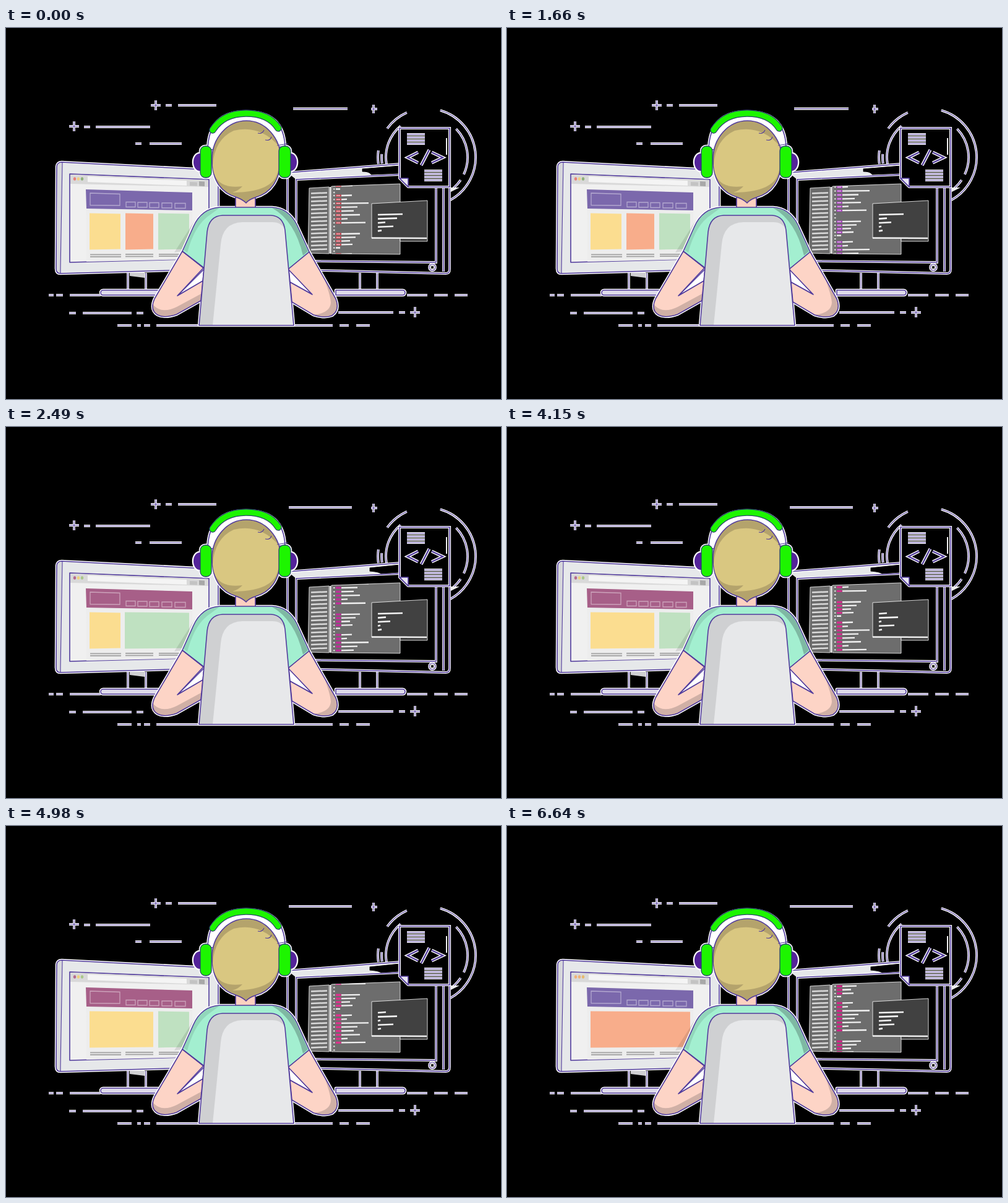
An HTML page that plays this animation: 800 px wide and 600 px high, repeating every 7470 ms.

```html
<!DOCTYPE html>
<html lang="en">
<head>
<meta charset="utf-8">
<title>Coder at work</title>
<style>
  html, body { margin: 0; width: 100%; height: 100%; overflow: hidden; background: #000; }
  svg { display: block; width: 100%; height: 100%; }
  .ink { fill: none; stroke: #513b9c; stroke-width: 1.1; }
  .halo { fill: none; stroke: #fff; stroke-width: 3.8; }
  .edge { stroke: #513b9c; stroke-width: 1.6; stroke-linejoin: round; }
  .rim { fill: #fff; stroke: #fff; stroke-width: 4.6; stroke-linejoin: round; }
</style>
</head>
<body>
<svg viewBox="0 0 800 600">
  <defs>
    <path id="sparks" d="M234 125h16m-8-8v16M258 125h10M278 125h62M102 159h16m-8-8v16M126 160h10M145 160h88
      M209 187h10M232 187h52M594 124v14M590 131h10M69 432h8M81 432h11M103 432h50M648 432h33M692 432h22M725 432h21
      M102 461h11M124 461h79M211 461h11M537 460h89M635 460h10M653 460h16m-8-9v17
      M180 481h23M212 481h6M223 481h10M243 481h285M539 481h15M566 481h22"/>
    <path id="topLine"/>
    <path id="rings"/>
    <path id="leftBody" d="M90 217L343 230V392L265 392L88 397Q81 397 81 389L82 224Q83 217 90 217Z"/>
    <path id="rightMonitor" d="M455 300V234L636 220M469 330V245L636 237M717 256V390Q717 397 711 397L509 392
      M695 256V379L497 377M707 256V394"/>
    <path id="stands" d="M197 396V424M226 396V424M572 396v28M600 396v28"/>
    <path id="docLines" d="M648 172h29M648 177h29M648 182h29M648 187h29M676 231h29M676 236h29M676 241h29M676 246h29"/>
    <path id="brackets" d="M666 201L649 209.500L666 218M684 197L671 222M688 201L706 209.500L688 218"/>
    <path id="leftArm" d="M285 361L240 438Q232 456 245 464Q256 470 276 463L315 441L318 409L277 433L319 388Z"/>
    <path id="rightArm" d="M490 362L533 438Q540 456 527 465Q515 470 497 464L462 443L459 411L495 431L456 390Z"/>
    <path id="shirt" d="M345 290H430Q456 291 470 318L490 362L456 390L320 388L285 361L303 321Q316 292 345 290Z"/>
    <path id="chair" d="M312 481L325 330Q328 304 350 303H428Q448 304 451 327L465 481Z"/>
    <path id="hair" d="M333 212A55.500 62 0 0 1 444 212Q442 263 403 274Q393 277 388 283Q382 277 373 274Q333 262 333 212Z"/>
    <path id="headset" d="M326 197Q327 135 388 135Q449 135 451 192Z"/>
    <g id="ears"><ellipse cx="313" cy="217" rx="10" ry="14"/><ellipse cx="460" cy="217" rx="10" ry="14"/></g>
    <g id="cups"><rect x="314" y="191" width="18" height="51" rx="8"/><rect x="441" y="191" width="19" height="51" rx="8"/></g>
    <clipPath id="editorClip"><path d="M526 256L637 252V366L526 365Z"/></clipPath>
  </defs>

  <use href="#sparks" class="halo"/><use href="#sparks" class="ink"/>
  <use href="#topLine" class="halo"/><use href="#topLine" class="ink"/>
  <use href="#rings" class="halo"/><use href="#rings" class="ink"/>
  <use href="#stands" class="halo"/><use href="#stands" class="ink"/>
  <g id="bases">
    <path d="M157 424H248V432H157A4 4 0 0 1 157 424ZM533 424H641A4 4 0 0 1 641 432H533Z" class="rim"/>
    <path d="M157 424H248V432H157A4 4 0 0 1 157 424ZM533 424H641A4 4 0 0 1 641 432H533Z" fill="#dedbea" class="edge"/>
  </g>

  <!-- left monitor -->
  <g>
    <path d="M200 394h24v10l-24-3z" fill="#d0d0d3"/>
    <use href="#leftBody" class="rim"/>
    <use href="#leftBody" fill="#e6e8ea" class="edge"/>
    <path d="M90 218Q83 218 83 225L82 389Q82 396 88 396Z" fill="#d6d7db"/>
    <path d="M91 218L88 390V397" class="ink"/>
    <path d="M103 236L328 245V373L103 379Z" fill="#f0f0f0" class="edge"/>
    <path d="M104 237L327 246V257L104 252Z" fill="#d9d9d9"/>
    <path d="M132 240L292 247V255L132 249Z" fill="#f4f4f4"/>
    <path d="M297 249l12 .5v6l-12-.5z" fill="#c3c3c3"/>
    <path d="M312 248l9 .5v7.500l-9-.5z" fill="#a8a8a8"/>
    <path d="M129 261L301 266V374L130 378Z" fill="#ededed"/>
    <g id="lights"></g>
    <path id="banner" d="M129 261L301 266V295L130 292Z"/>
    <path d="M136 267l48 1.500v18.500l-48-.5zM194 281.500h15v8h-15zM213 282h15v8h-15zM232 282.500h15v8h-15zM252 283h16v8h-16zM273 283.500h17v8h-17z"
      fill="none" stroke="#fff" stroke-opacity=".42" stroke-width="1.300"/>
    <g id="cards"></g>
    <path d="M136 366.500h50M136 370h50M193 366h45M193 369.500h45M247 366h40M247 369h40" stroke="#a8a8a8" stroke-width="1.800"/>
  </g>

  <!-- right monitor -->
  <g>
    <path d="M455 234L636 220V238L469 245Z" fill="#e6e8ea"/>
    <use href="#rightMonitor" class="halo"/>
    <path id="gap" fill="#000" stroke="#fff"/>
    <use href="#rightMonitor" class="ink" style="stroke-width:1.500"/>
    <circle cx="689" cy="387" r="5" class="halo"/><circle cx="689" cy="387" r="5" class="ink"/>
    <circle cx="689" cy="387" r="2.500" fill="#000" stroke="#fff"/>
    <path d="M490 259L522 257V365L488 364Z" fill="#6b6b6b" stroke="#fff" stroke-width=".8"/>
    <path id="gutter" stroke="#dadada" stroke-width="2.500"/>
    <path d="M524 257V365" stroke="#eee" stroke-width="2.500"/>
    <path d="M526 256L637 252V366L526 365Z" fill="#6d6d6d" stroke="#fff" stroke-width=".8"/>
    <g clip-path="url(#editorClip)" fill="none" stroke-width="2.300">
      <path id="dots" stroke="#dadada"/>
      <path id="tags" stroke-width="3.400"/>
      <path id="tagMarks" stroke="#eee" stroke-width="1"/>
      <path id="code" stroke="#f1f1f1"/>
    </g>
    <path d="M591 284L681 279V345H637V340H591Z" fill="#414141" stroke="#fff" stroke-width=".8"/>
    <path d="M591 339.500L680 340" stroke="#ededed" stroke-width="2.500"/>
    <path id="terminal" stroke="#f2f2f2" stroke-width="2.600"/>
  </g>

  <!-- code document -->
  <g>
    <path d="M636 162H717V257H650L636 243Z" fill="#000" stroke="#fff" stroke-width="4.200"/>
    <path d="M636 162H717V257H650L636 243Z" class="ink" style="stroke-width:1.600"/>
    <path d="M636 243H650V257Z" fill="#e8e6f2" class="edge"/>
    <path d="M712 178v27" stroke="#eee" stroke-width="2"/>
    <path d="M719 258h14l-14 7z" fill="#eee"/>
    <use href="#docLines" class="halo"/><use href="#docLines" class="ink"/>
    <use href="#brackets" class="halo" style="stroke-width:5"/><use href="#brackets" class="ink" style="stroke-width:2.300"/>
  </g>

  <!-- person -->
  <g>
    <path d="M343 290Q316 293 300 319L272 363L285 361L305 318Z" fill="#000" opacity=".1"/>
    <g class="rim">
      <use href="#leftArm"/><use href="#rightArm"/><use href="#shirt"/><use href="#chair"/>
      <use href="#hair"/><use href="#headset"/><use href="#ears"/><use href="#cups"/>
    </g>
    <path d="M320 390L277 433L318 410ZM457 390L495 431L459 411Z" fill="#fff" class="edge"/>
    <use href="#leftArm" fill="#fdd4c6"/><use href="#rightArm" fill="#fdd4c6"/>
    <path d="M238 448Q232 458 245 464Q256 470 276 463L315 441V430L276 451Q252 463 238 448Z" fill="#d0b0a6"/>
    <path d="M512 400L533 438Q540 456 527 465Q515 470 497 464Q524 461 525 444Q524 430 512 400Z" fill="#d0b0a6"/>
    <g fill="none" class="edge"><use href="#leftArm"/><use href="#rightArm"/></g>
    <path d="M371 273H403V292H371Z" fill="#fdd0c0" class="edge"/>
    <use href="#shirt" fill="#a3efd0" class="edge"/>
    <path d="M345 291Q317 293 304 321L287 359L293 363Q305 318 330 302Z" fill="#000" opacity=".1"/>
    <path d="M430 291Q455 292 469 318L488 361L480 368Q467 312 430 291Z" fill="#7fb9a3"/>
    <use href="#chair" fill="#cfd0d2"/>
    <path d="M334 481L347 350Q350 315 382 314H430Q446 314 451 327L465 481Z" fill="#e7e8ea"/>
    <use href="#chair" fill="none" class="edge"/>

    <use href="#headset" fill="#fff" class="edge"/>
    <use href="#hair" fill="#b4a36c" class="edge"/>
    <path d="M334 222Q337 180 368 166Q410 156 440 190Q447 220 435 243Q420 266 366 266Q376 263 382 256Q336 262 334 222Z" fill="#d9c781"/>
    <path d="M407 170Q414 172 417 165M419 181Q427 183 429 176M438 190L456 187" class="ink"/>
    <path d="M334 165Q351 138 388 138Q425 138 440 162" fill="none" stroke="#27466b" stroke-width="11.500" stroke-linecap="round"/>
    <path d="M334 165Q351 138 388 138Q425 138 440 162" fill="none" stroke="#1df500" stroke-width="9" stroke-linecap="round"/>
    <use href="#ears" fill="#54239a"/>
    <use href="#cups" fill="#1df500" stroke="#27466b" stroke-width="1.300"/>
  </g>
</svg>

<script>
const STEP = 830, STATES = 9;
const YELLOW = '#fbdd90', ORANGE = '#f8ad8b', GREEN = '#bfe1c1';
const PURPLE = '#7b68ac', MAGENTA = '#a75f88';
const $ = id => document.getElementById(id);
const setPath = (id, d) => $(id).setAttribute('d', d);
const range = n => [...Array(n).keys()];

// Page layouts: each card is [left, right, colour].
const layouts = [
  [[135, 185, YELLOW], [193, 238, ORANGE], [246, 296, GREEN]],
  [[135, 185, YELLOW], [192, 296, GREEN]],
  [[135, 238, YELLOW], [246, 296, GREEN]],
  [[135, 296, ORANGE]]
];
const layoutOf = [0, 0, 0, 1, 1, 2, 2, 3, 3];
const tagColors = ['#d6404f', '#c63a8c', '#b03bc8', '#bd2f98', '#bf2b8b', '#d02f8b', '#dc318c', '#ee4f78', '#cf2585'];
const lightColors = [['#e8817a', '#f0cf86', '#8fb07c'], ['#b56a8f', '#eed27c', '#a9c78a'], ['#e5788a', '#e9c973', '#a9c78a'], ['#f0b277', '#f0b277', '#e6b96f']];

// Right ends of the terminal lines; each starts at x = 601.
const terminals = {
  long: [641, 632, 613, 626, 607],
  brief: [641, 614, 621, 605, 607],
  sparse: [614, 632, 605, 626, 606],
  full: [641, 632, 621, 626, 607]
};
const terminalOf = ['long', 'long', 'brief', 'brief', 'long', 'sparse', 'sparse', 'sparse', 'full'];

// The editor scrolls through two repeating blocks of lines.
const PERIOD = 95;
const shortBlock = [572, 565, 556, 560];
const longBlock = [559, 551, 586, 568, 562, 572, 552, 581];

function arc(r, from, to) {
  const point = deg => {
    const a = deg * Math.PI / 180;
    return `${680 + r * Math.cos(a)} ${209 + r * Math.sin(a)}`;
  };
  return `M${point(from)}A${r} ${r} 0 0 1 ${point(to)}`;
}

function drawEditor(state) {
  let code = '', tags = '', marks = '', dots = '';
  const row = (y, end) => {
    code += `M542 ${y}L${end} ${y - .5}`;
    tags += `M533 ${y}h8.500`;
    marks += `M534 ${y}h6`;
    dots += `M529 ${y}h2.500`;
  };
  for (const shift of [-PERIOD, 0, PERIOD]) {
    const top = 333 - 9.95 * state + shift;
    shortBlock.forEach((end, i) => row(top + i * 5.8, end));
    code += `M533 ${top + 22.5}h7`;
    dots += `M529 ${top + 22.5}h2.500M529 ${top + 28}h2.500M529 ${top - 6}h2.500M529 ${top - 12}h2.500`;
    longBlock.forEach((end, i) => row(top + 33 + i * 6.3, end));
  }
  setPath('code', code);
  setPath('tags', tags);
  setPath('tagMarks', state < 3 ? marks : '');
  setPath('dots', dots);
  $('tags').setAttribute('stroke', tagColors[state]);
}

function drawState(state) {
  const layout = layoutOf[state];
  $('banner').setAttribute('fill', layout % 3 ? MAGENTA : PURPLE);
  $('cards').innerHTML = layouts[layout].map(([left, right, color]) =>
    `<path d="M${left} 299.500L${right} 300.500V357.500L${left} 358.500Z" fill="${color}"/>`).join('');
  const lights = state === 8 ? 3 : state === 7 ? 2 : state > 2 ? 1 : 0;
  $('lights').innerHTML = lightColors[lights].map((color, i) =>
    `<ellipse cx="${111 + 6 * i}" cy="244" rx="2.200" ry="2.700" fill="${color}"/>`).join('');
  setPath('terminal', terminals[terminalOf[state]].map((end, i) =>
    `M601 ${302 + i * 6.6}L${end} ${301 + i * 6.6}`).join(''));
  const early = state < 3;
  setPath('topLine', early ? 'M464 130.500H552' : 'M457 130H559');
  setPath('gap', early ? 'M575 227L636 222V236L590 238Q588 233 575 233Z' : 'M587 227L636 222V236L606 238Q602 235 587 234Z');
  drawEditor(state);
}

setPath('rings', arc(79, -74, 61) + arc(79, 172, 188) + arc(79, 216, 246) + arc(73, 172, 184)
  + arc(66, 170, 230) + arc(66, -44, 25) + arc(66, 34, 55));
setPath('gutter', range(15).map(i => `M493 ${267.5 + i * 6.5}L519 ${266.5 + i * 6.5}`).join(''));

let shown = -1;
function tick() {
  const state = Math.floor(performance.now() / STEP) % STATES;
  if (state !== shown) drawState(shown = state);
  requestAnimationFrame(tick);
}
tick();
</script>
</body>
</html>
```
